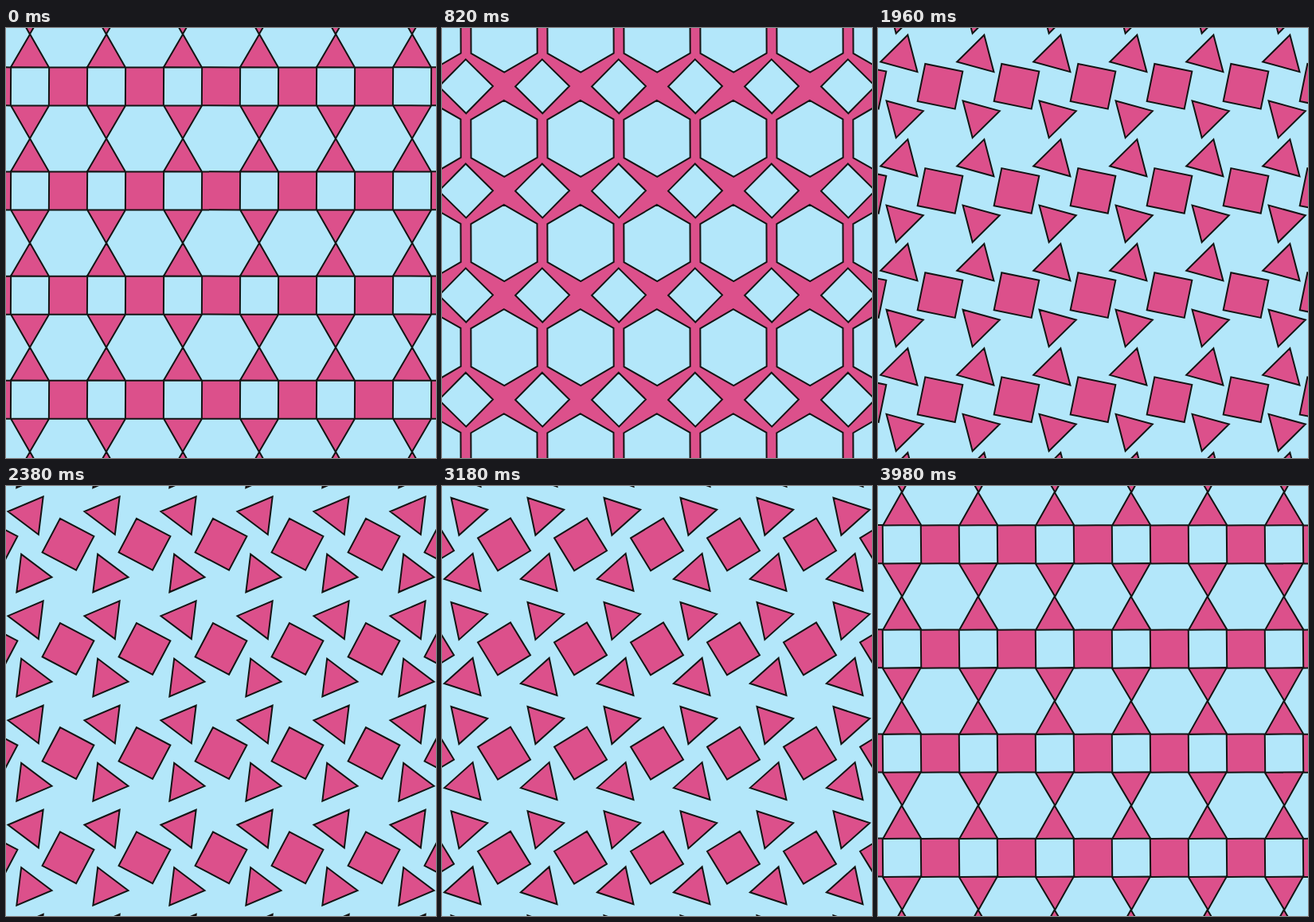
These frames come from a looping animation (540x540 px, 4 s). An HTML page:

```html
<!DOCTYPE html>
<html lang="en">
<head>
<meta charset="utf-8">
<title>Turning tiles</title>
<style>
  html, body { margin: 0; width: 100%; height: 100%; overflow: hidden; }
  svg { display: block; width: 100vw; height: 100vh; }
</style>
</head>
<body>
<svg viewBox="0 0 540 540">
  <rect id="ground" width="540" height="540"/>
  <path id="tiles" stroke="#141414" stroke-width="2" stroke-linejoin="miter"/>
</svg>
<script>
const BLUE = '#b3e7fa', PINK = '#dc508b';
const LOOP = 4000;
const SWITCH = LOOP * 5 / 12;
const SHUTTER = 5; // centre of the exposure, in ms

const SIDE = 48;
const STEP_X = 2 * SIDE;
const STEP_Y = SIDE * (1 + Math.sqrt(3));
const TRI = SIDE / Math.sqrt(3);

const ground = document.getElementById('ground');
const tiles = document.getElementById('tiles');

// Each kind: corner count, centre, and direction of its first corner in degrees.
const hexagon = { n: 6, x: 78, y: 270, start: 0 };
const blueSquare = { n: 4, x: 30, y: 270 - STEP_Y / 2, start: 45 };
const pinkSquare = { ...blueSquare, x: 78 };
const upTriangle = { n: 3, x: 30, y: 270 + TRI, start: -90 };
const downTriangle = { n: 3, x: 30, y: 270 - TRI, start: 90 };

// A full turn of progress carries every polygon onto itself.
function lattice({ n, x, y, start }, progress) {
  const radius = SIDE / (2 * Math.sin(Math.PI / n));
  const corners = Array.from({ length: n }, (_, i) => {
    const a = (start + 360 / n * (i + progress)) * Math.PI / 180;
    return [radius * Math.cos(a), radius * Math.sin(a)];
  });
  let d = '';
  for (let row = -3; row <= 3; row++) {
    for (let col = -1; col <= 6; col++) {
      const cx = x + col * STEP_X, cy = y + row * STEP_Y;
      d += 'M' + corners.map(([u, v]) =>
        (cx + u).toFixed(2) + ' ' + (cy + v).toFixed(2)).join('L') + 'Z';
    }
  }
  return d;
}

function draw(ms) {
  const t = (ms + SHUTTER) % LOOP;
  const blueTurns = t < SWITCH;
  const progress = blueTurns ? t / SWITCH : (t - SWITCH) / (LOOP - SWITCH);
  const kinds = blueTurns
    ? [hexagon, blueSquare]
    : [pinkSquare, upTriangle, downTriangle];
  ground.setAttribute('fill', blueTurns ? PINK : BLUE);
  tiles.setAttribute('fill', blueTurns ? BLUE : PINK);
  tiles.setAttribute('d', kinds.map(kind => lattice(kind, progress)).join(''));
}

function tick() {
  draw(performance.now());
  requestAnimationFrame(tick);
}
draw(0);
requestAnimationFrame(tick);
</script>
</body>
</html>
```
